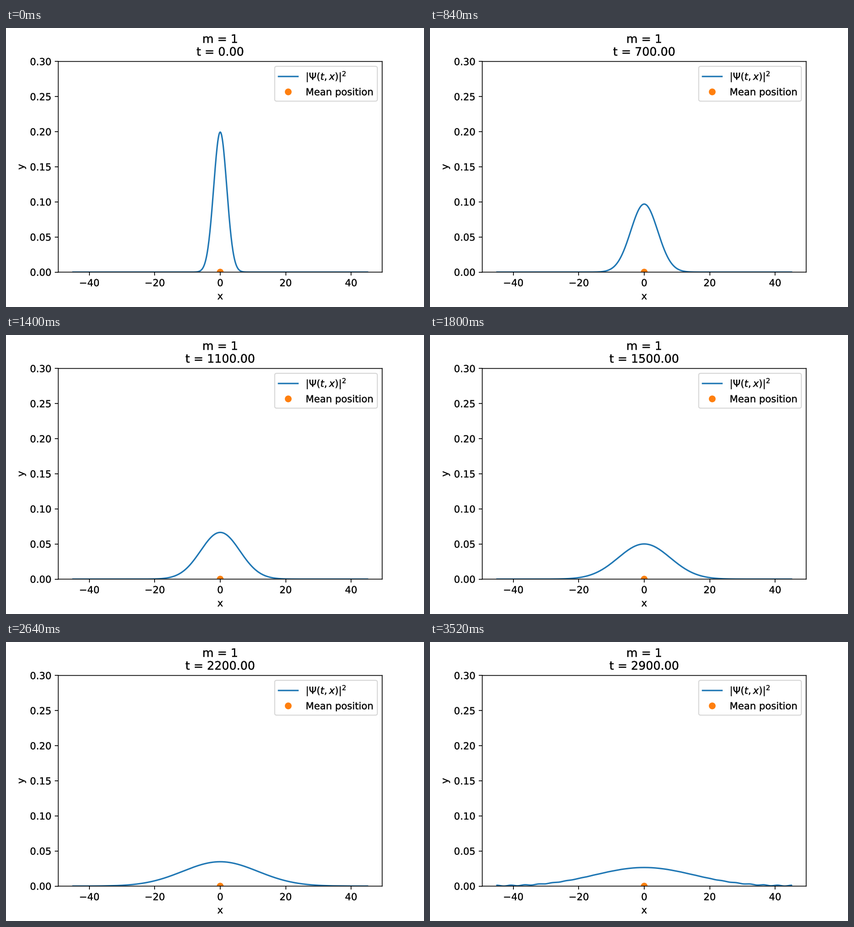
Animation, 917 px wide and 611 px high, one loop 3600 ms. Source, as a matplotlib script:

```python
import numpy as np
import matplotlib.patheffects as pe
import matplotlib.pyplot as plt
from matplotlib.animation import FuncAnimation
from matplotlib.text import Text

FRAMES = 30
TIME_STEP = 100
SIGMA = 2.0          # initial width of the packet
SPREAD = 0.00257     # spreading rate per unit of time
HALF = 45.0          # half the periodic domain

# place outlines, markers and glyphs at sub-pixel positions
plt.rcParams.update({
    "text.hinting": "none",
    "path.snap": False,
    "path.effects": [pe.Normal()],
})

x = np.linspace(-HALF, HALF, 601)


def packet(pos, t):
    """Free Gaussian wave packet at rest."""
    s = 1 + 1j * SPREAD * t
    norm = (2 * np.pi * SIGMA**2) ** -0.25
    return norm / np.sqrt(s) * np.exp(-pos**2 / (4 * SIGMA**2 * s))


def density(t):
    # neighbouring periods leak in and interfere near the edges
    psi = sum(packet(x + 2 * HALF * n, t) for n in (-1, 0, 1))
    return np.abs(psi) ** 2


fig, ax = plt.subplots(figsize=(6, 3.99782), dpi=917 / 6)
fig.subplots_adjust(left=0.125, right=0.9, bottom=0.125, top=0.88)

curve, = ax.plot(x, density(0), label=r"$|\Psi(t,x)|^2$")
ax.plot([0], [0], "o", label="Mean position")
ax.set_xlim(-1.1 * HALF, 1.1 * HALF)
ax.set_ylim(0, 0.3)
ax.set_xlabel("x")
ax.set_ylabel("y")
ax.legend(loc="upper right")
title = ax.set_title("")

# a hairline around the glyphs gives the text its weight
fig.canvas.draw()
for text in fig.findobj(Text):
    text.set_path_effects([pe.Stroke(linewidth=0.2, foreground="black")])


def update(i):
    t = i * TIME_STEP
    curve.set_ydata(density(t))
    title.set_text(f"m = 1\nt = {t:.2f}")
    return curve, title


anim = FuncAnimation(fig, update, frames=FRAMES, interval=120,
                     init_func=lambda: update(0), repeat=True, repeat_delay=0)
plt.show()
```
